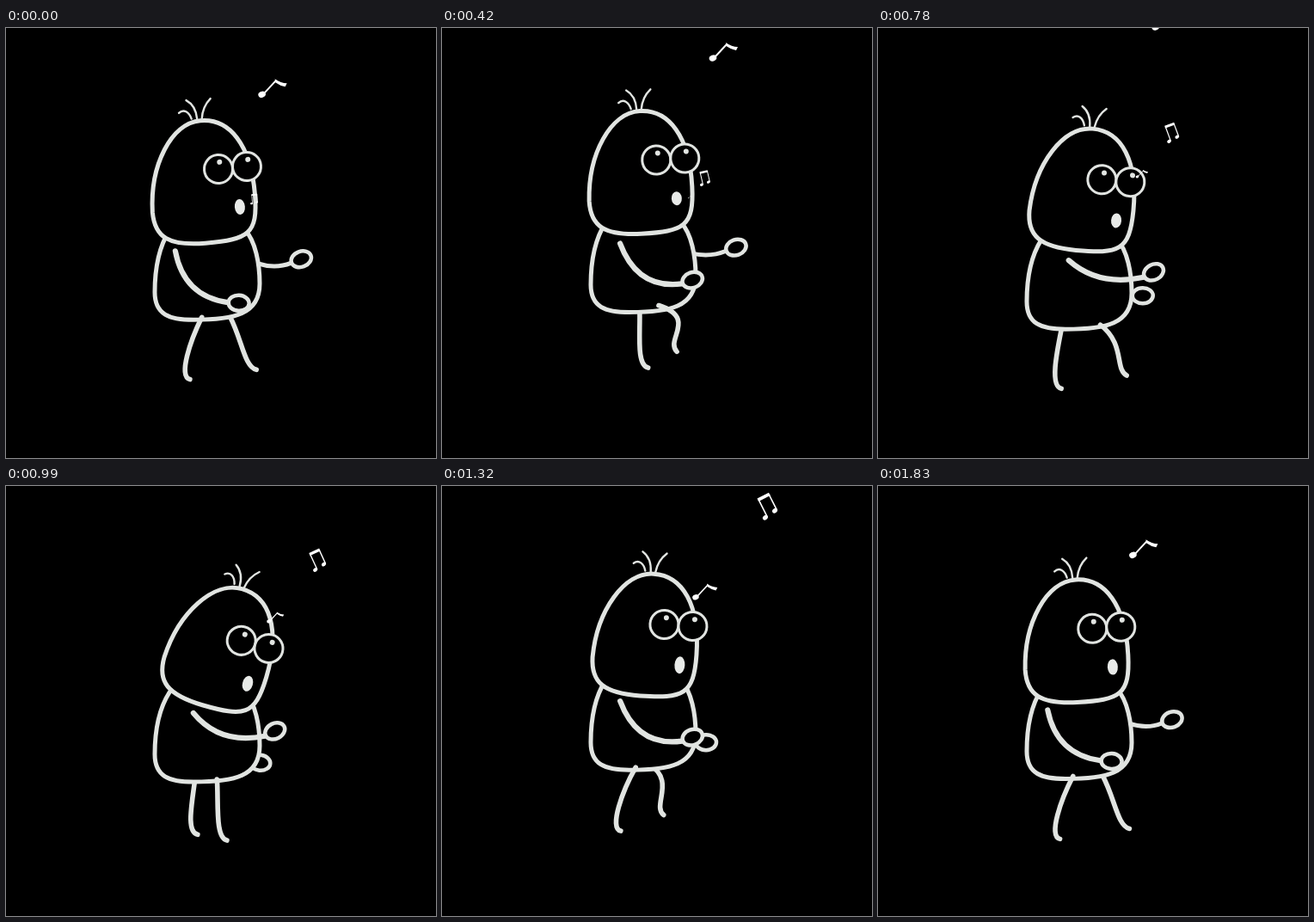
Write an HTML page with a canvas that moves like this. It is 500 by 500 pixels and loops after 1860 ms.

```html
<!DOCTYPE html>
<html lang="en">
<head>
<meta charset="utf-8">
<title>Whistling walk</title>
<style>
html, body { margin: 0; width: 100%; height: 100%; overflow: hidden; background: #000; }
canvas { display: block; width: 100vmin; height: 100vmin; }
</style>
</head>
<body>
<canvas width="500" height="500"></canvas>
<script>
const ctx = document.querySelector('canvas').getContext('2d');
const LOOP = 1860, STEP = 30, INK = '#e1e4e1', RAD = Math.PI / 180;

// Key points: [time, value] for the head, [time, x, y] for the notes.
const TILT = [[-30, -3.5], [0, -5.2], [190, -8.3], [420, -3.5], [780, 5], [990, 16],
  [1320, 3.5], [1560, -5.4], [1830, -3.5], [1860, -5.2]];
const SINGLE = [[390, 287, 199], [990, 313, 153], [1560, 301, 100], [2280, 327, 28], [2700, 336, -14]];
const PAIR = [[0, 289, 198], [420, 305.5, 173], [990, 362, 84], [1320, 378, 21], [1560, 383.5, -13], [1740, 385, -38]];

const HEAD = new Path2D('M7-133C-27-133-56-87-58-32C-58-2-42 9 0 9.5C50 9.5 62 5 62.5-42C63-100 41-133 7-133Z');
const HAIR = new Path2D('M-3-136C-5-144-11-149-17-144M3.5-135Q3.5-151-7.2-158M9-135Q11-149 21-157.5');
const BODY = new Path2D('M190-104C176-82 173-55 173-32C173-6 190 0 218 0C265 0 295-6 295-42C295-65 290-92 278-104');

// Smooth curve through key points.
function along(keys, t) {
  const last = keys.length - 1;
  let i = 0;
  while (i < last - 1 && keys[i + 1][0] <= t) i++;
  const b = keys[i], c = keys[i + 1], a = keys[i - 1] || b, d = keys[i + 2] || c;
  const span = c[0] - b[0], u = (t - b[0]) / span;
  return b.map((v, k) => {
    const m0 = (c[k] - a[k]) / (c[0] - a[0]) * span;
    const m1 = (d[k] - v) / (d[0] - b[0]) * span;
    return v + (c[k] - v) * u * u * (3 - 2 * u) + m0 * u * (1 - u) ** 2 - m1 * u * u * (1 - u);
  }).slice(1);
}

function at(x, y, degrees, draw, scale = 1) {
  ctx.save();
  ctx.translate(x, y);
  ctx.rotate(degrees * RAD);
  ctx.scale(scale, scale);
  draw();
  ctx.restore();
}

function line(width, path) {
  ctx.lineWidth = width;
  ctx.stroke(path);
}

function solid(width, path) {
  ctx.fillStyle = '#000';
  ctx.fill(path);
  line(width, path);
}

function oval(x, y, rx, ry = rx, tilt = 0) {
  const p = new Path2D();
  p.ellipse(x, y, rx, ry, tilt, 0, 7);
  return p;
}

function dot(color, ...shape) {
  ctx.fillStyle = color;
  ctx.fill(oval(...shape));
}

// The shorter the leg gets, the more its knee pushes forward.
function leg(hipX, base, x, y) {
  const bend = Math.max(0, Math.min(1, (59 - y + base) / 8)) ** 2;
  const hipY = base - 3 - 5 * bend, p = new Path2D();
  p.moveTo(hipX, hipY);
  p.bezierCurveTo(hipX + .6 * (x - hipX) - 5 + 38 * bend, hipY + 27 - 12 * bend,
    x - 14, y - 3 - 11 * bend, x, y);
  line(5.6, p);
}

function arm(width, shoulderX, shoulderY, bendX, bendY, x, y, tilt) {
  const p = new Path2D(), a = tilt * RAD;
  p.moveTo(shoulderX, shoulderY);
  p.quadraticCurveTo(bendX, bendY, x - 13 * Math.cos(a), y - 13 * Math.sin(a));
  line(width, p);
  at(x, y, tilt, () => solid(4.5, oval(0, 0, 12, 9)));
}

function face(mouth) {
  solid(5, HEAD);
  line(2.4, HAIR);
  for (const x of [22.9, 56]) {
    solid(3, oval(x, -75, 16.5));
    dot(INK, x + 2, -83, 3);
  }
  dot('#e8eae8', 43.7, -29, 6, mouth);
}

function figure(t) {
  const phase = t / LOOP * 2 * Math.PI;
  // One sway per loop plus one per step.
  const wave = (mean, c1, s1, c2, s2) => mean + c1 * Math.cos(phase) + s1 * Math.sin(phase)
    + c2 * Math.cos(2 * phase) + s2 * Math.sin(2 * phase);

  const base = wave(337.8, -4, .6, 5.5, -6.7);
  const neck = wave(239.1, -3.6, -2, 5.3, -5.8);
  const near = { x: wave(293, -22.9, 4.1, .6, -6.1), y: wave(297.8, 17.6, -3, 4.4, -.7) };
  const far = { x: wave(323, 23, 13, -2.7, 0), y: wave(286.2, -26.6, -16.7, 9.2, -5.9) };
  const nearFoot = { x: wave(241.2, -27, 38.2, -.3, -7), y: wave(399.8, -1.7, -12.2, 10.5, -3.7) };
  const farFoot = { x: wave(252.5, 36.3, -16.5, 2.4, 1), y: wave(398, -7, 7.2, 6.3, -9.9) };

  ctx.strokeStyle = INK;
  leg(86 + .6 * farFoot.x, base, farFoot.x, farFoot.y);
  arm(5, 270, base - 75, far.x - 38, far.y + 15, far.x, far.y, (306 - far.x) * .55);
  at(0, base, 0, () => solid(5, BODY));
  leg(140 + .41 * nearFoot.x, base, nearFoot.x, nearFoot.y);
  at(231, neck, along(TILT, t)[0], () => face(9 - Math.sin(phase)));
  arm(6.2, 61.5 + near.x / 2, base - 80, near.x - 64, 216 + .3 * near.y,
    near.x, near.y, (near.y - 316) * .85);
}

function single() {
  line(2, new Path2D('M-9 5L4-9'));
  ctx.fill(new Path2D('M3-11Q10-6 17-6L15-2Q9-3 3.5-7Z'));
  dot('#fff', -12, 7, 4.4, 3.5, -.4);
}

function pair() {
  line(1.6, new Path2D('M-6.5-9V13M7-9V11'));
  ctx.fillRect(-7.3, -11, 15.1, 3.8);
  dot('#fff', -9, 13, 3.2, 2.5, -.2);
  dot('#fff', 4.5, 11, 3.2, 2.5, -.2);
}

// Notes grow as they rise; the beamed one also leans over.
function note(keys, t, draw, size, growth, lean) {
  const age = t - keys[0][0];
  if (age < 0 || t >= keys[keys.length - 1][0]) return;
  const [x, y] = along(keys, t);
  ctx.strokeStyle = ctx.fillStyle = '#fff';
  at(x, y, lean && Math.max(-27, -5 - lean * age), draw, Math.min(1, size + growth * age));
}

function frame(now) {
  const t = Math.floor(now % LOOP / STEP) * STEP;
  ctx.fillStyle = '#000';
  ctx.fillRect(0, 0, 500, 500);
  ctx.lineCap = ctx.lineJoin = 'round';
  figure(t);
  // The single note outlives one loop, so two can be in the air.
  for (const shift of [0, LOOP]) note(SINGLE, t + shift, single, .11, .00082, 0);
  note(PAIR, t, pair, .45, .00042, .02);
}

const start = performance.now();
(function tick() {
  frame(performance.now() - start);
  requestAnimationFrame(tick);
})();
</script>
</body>
</html>
```
